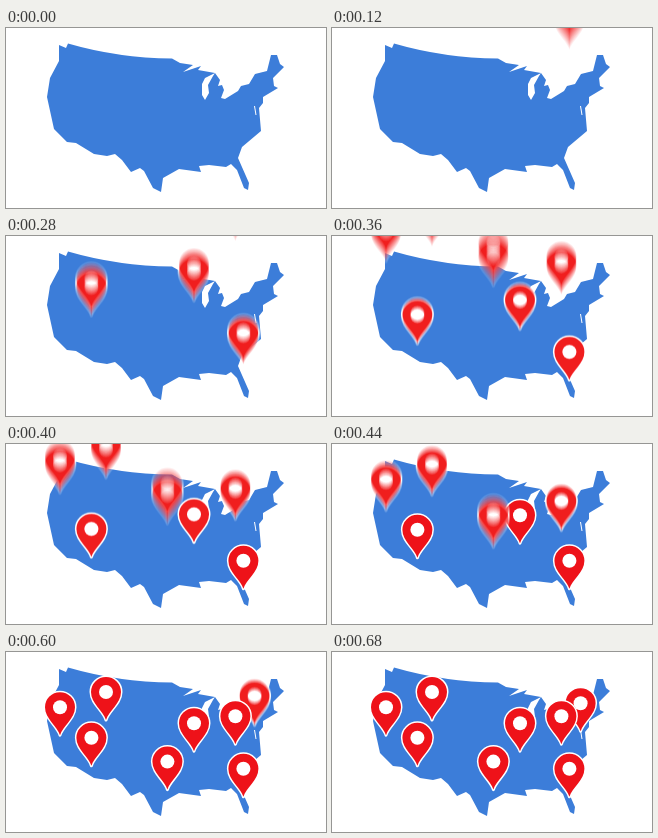
An HTML page with a canvas for the animation above (1240 ms loop, 320x180 px).

```html
<!DOCTYPE html>
<html lang="en">
<head>
<meta charset="utf-8">
<title>Map pins</title>
<style>
  html, body { margin: 0; width: 100%; height: 100%; overflow: hidden; background: #fff; }
  canvas { display: block; width: 320px; height: 180px; }
</style>
</head>
<body>
<canvas id="stage" width="320" height="180"></canvas>
<script>
const WIDTH = 320, HEIGHT = 180;
const LOOP = 1240, STEP = 40;
const SHUTTER = 20, SAMPLES = 15;
const GRAVITY = 0.00197;
const BLUE = '#3c7dd9', RED = '#ee1219';

const layer = () => Object.assign(document.createElement('canvas'), { width: WIDTH, height: HEIGHT }).getContext('2d');
const ctx = document.getElementById('stage').getContext('2d');
const single = layer(), smear = layer();

const land = new Path2D(`M62 15.5 Q112 30 166 30.5
  L174 35 187 37 177 44 195 38 192 42 209 45
  214 52 212 58 216 57 218 62 215 70 219 71 232 63 235 58 243 56 249 46 261 43
  265 27 271 27 274 36 278 39 267 50 268 58 272 60 257 69 257 75 253 80
  255 103 236 119 232 130 243 155 242 162 238 160 231 142 225 136 220 139
  203 137 193 138 195 144 173 141 157 150 155 164 147 160 138 143 134 140
  125 144 116 132 109 126 101 128 88 126 70 115 61 114 48 101 41 69
  44 50 53 33 53 17 60 20Z`);

const lake = new Path2D('M209 45 L199 50 196 56 196 67 199 72 203 65 202 57 207 48Z');
const bay = new Path2D('M248.5 78 L250 87');

const drop = new Path2D('M0 28 C-2.5 19 -15 11.5 -15 0 A15 15 0 0 1 15 0 C15 11.5 2.5 19 0 28Z');
const hole = new Path2D();
hole.arc(0, 0, 7, 0, 2 * Math.PI);

// Head centre and landing time, back to front
const pins = [
  { x: 100, y: 40, lands: 540 },
  { x: 248.6, y: 51.2, lands: 660 },
  { x: 54, y: 55.2, lands: 540 },
  { x: 229.4, y: 64.2, lands: 500 },
  { x: 188, y: 71.2, lands: 420 },
  { x: 85.4, y: 85.8, lands: 420 },
  { x: 161.4, y: 109.6, lands: 580 },
  { x: 237.4, y: 116.8, lands: 380 }
];

const rise = (pin, t) => GRAVITY * Math.max(0, pin.lands - t) ** 2;

function drawPin(c, x, y) {
  c.save();
  c.translate(x, y);
  c.strokeStyle = '#fff';
  c.lineWidth = 3;
  c.lineJoin = 'round';
  c.stroke(drop);
  c.fillStyle = RED;
  c.fill(drop);
  c.fillStyle = '#fff';
  c.fill(hole);
  c.restore();
}

// Averages the pin over the time the shutter is open
function drawFalling(pin, t) {
  smear.clearRect(0, 0, WIDTH, HEIGHT);
  smear.globalCompositeOperation = 'lighter';
  smear.globalAlpha = 1 / SAMPLES;
  for (let i = 0; i < SAMPLES; i++) {
    const when = t + (i / (SAMPLES - 1) - 0.5) * SHUTTER;
    single.clearRect(0, 0, WIDTH, HEIGHT);
    drawPin(single, pin.x, pin.y - rise(pin, when));
    smear.drawImage(single.canvas, 0, 0);
  }
  ctx.drawImage(smear.canvas, 0, 0);
}

function draw(t) {
  ctx.fillStyle = '#fff';
  ctx.fillRect(0, 0, WIDTH, HEIGHT);
  ctx.fillStyle = BLUE;
  ctx.fill(land);
  ctx.fillStyle = ctx.strokeStyle = '#fff';
  ctx.fill(lake);
  ctx.stroke(bay);
  for (const pin of pins) {
    const up = rise(pin, t);
    if (up > pin.y + 45) continue;
    if (up > 0) drawFalling(pin, t);
    else drawPin(ctx, pin.x, pin.y);
  }
}

const start = performance.now();
let shown = -1;
function tick() {
  const elapsed = (performance.now() - start) % LOOP;
  const t = Math.floor(elapsed / STEP) * STEP;
  if (t !== shown) draw(shown = t);
  requestAnimationFrame(tick);
}
tick();
</script>
</body>
</html>
```
